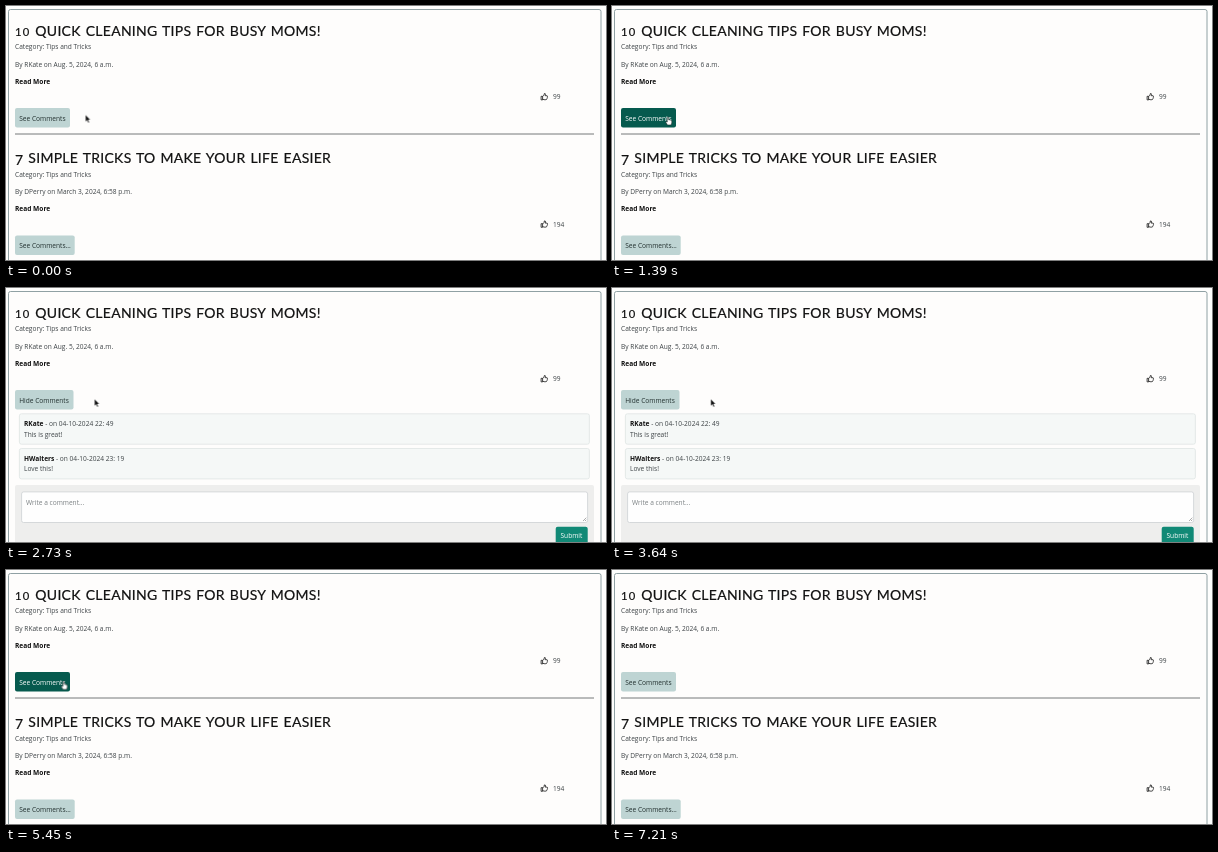
Write an HTML page that moves like this. It is 600 by 254 pixels and loops after 7240 ms.

```html
<!DOCTYPE html>
<html lang="en">
<head>
<meta charset="utf-8">
<title>Blog comments toggle</title>
<style>
  html, body { margin: 0; width: 100%; height: 100%; overflow: hidden; background: #fefefd; }
  svg { display: block; width: 600px; height: 254px; }
  text { font: 6.6px "Open Sans", "Noto Sans", sans-serif; fill: #3d4346; white-space: pre; }
  .title { font: 14px Lato, sans-serif; letter-spacing: .27px; word-spacing: 1.1px; fill: #111; stroke: #111; stroke-width: .2; }
  .low { font-size: 11.2px; letter-spacing: 1.2px; }
  .bold { font-weight: 700; fill: #111; }
  .button { fill: #bed4d3; }
  .label { fill: #22302f; }
  .card { fill: #f5f8f7; stroke: #dfe5e4; stroke-width: .8; }
  .hint { fill: #7b8083; }
  .white { fill: #fff; }

  /* One shared 7.24 s timeline */
  .hot, .hot-label, .cursor, .arrow, .hand, .open, .closed { animation: 7.24s infinite; }
  .hot { animation-name: heat; animation-timing-function: linear; }
  .hot-label { animation-name: heat-label; animation-timing-function: linear; }
  .cursor { animation-name: travel; animation-timing-function: ease-in-out; }
  .arrow { animation-name: arrow; animation-timing-function: step-end; }
  .hand { animation-name: hand; animation-timing-function: step-end; }
  .open { animation-name: open; animation-timing-function: step-end; }
  .closed { animation-name: closed; animation-timing-function: step-end; }

  @keyframes heat {
    0%, 9.25%, 37.7%, 62.4%, 79.4%, 100% { fill: #bed4d3; }
    11.3%, 35.6%, 64.5%, 77.3% { fill: #065a4e; }
  }
  @keyframes heat-label {
    0%, 9.25%, 37.7%, 62.4%, 79.4%, 100% { fill: #22302f; }
    11.3%, 35.6%, 64.5%, 77.3% { fill: #fff; }
  }
  @keyframes travel {
    0%, 4.14% { transform: translate(79.5px, 108.8px); }
    12.43%, 33.15% { transform: translate(56px, 110.9px); }
    40.06%, 53.87% { transform: translate(98.7px, 111px); }
    61.46% { transform: translate(70px, 112px); }
    64.09%, 75.28% { transform: translate(57.5px, 111.4px); }
    81.49%, 100% { transform: translate(88px, 111.3px); }
  }
  @keyframes arrow {
    0%, 35.6%, 77.3% { visibility: visible; }
    9.25%, 62.4%, 96%, 100% { visibility: hidden; }
  }
  @keyframes hand {
    0%, 35.6%, 77.3%, 100% { visibility: hidden; }
    9.25%, 62.4% { visibility: visible; }
  }
  @keyframes open {
    0%, 68.51%, 100% { visibility: hidden; }
    24.86% { visibility: visible; }
  }
  @keyframes closed {
    0%, 68.51%, 100% { visibility: visible; }
    24.86% { visibility: hidden; }
  }
</style>
</head>
<body>
<svg viewBox="0 0 600 254">
  <defs>
    <path id="thumb" d="M.4 3.3H1.9V6.9H.4ZM1.9 3.6L3.3 2.1 3.7.5Q4.9.3 4.8 1.6L4.5 2.7H6.3Q7.1 2.9 6.7 3.7 7 4.2 6.5 4.8 6.6 5.4 6.1 5.8 6 6.7 5.2 6.7H3.4L1.9 6.2"
      fill="none" stroke="#222" stroke-width=".85" stroke-linejoin="round"/>
  </defs>

  <rect x="2.5" y="3.5" width="592.5" height="270" rx="2" fill="#fefdfc" stroke="#84979a" stroke-width=".9"/>

  <text class="title" x="9" y="30"><tspan class="low">10</tspan> QUICK CLEANING TIPS FOR BUSY MOMS!</text>
  <text x="9" y="43.2">Category: Tips and Tricks</text>
  <text x="9" y="60.5">By RKate on Aug. 5, 2024, 6 a.m.</text>
  <text class="bold" x="9" y="77.9">Read More</text>
  <use href="#thumb" x="534.7" y="87"/>
  <text x="547" y="93.2">99</text>

  <g class="closed">
    <rect class="button hot" x="9" y="102" width="55" height="19.5" rx="2"/>
    <text class="label hot-label" x="13.2" y="114.5">See Comments</text>
    <path d="M9 128H588" stroke="#66696a" stroke-width=".9"/>

    <text class="title" x="9" y="157"><tspan dy="2">7</tspan><tspan dy="-2"> SIMPLE TRICKS TO MAKE YOUR LIFE EASIER</tspan></text>
    <text x="9" y="170.6">Category: Tips and Tricks</text>
    <text x="9" y="187.9">By DPerry on March 3, 2024, 6:58 p.m.</text>
    <text class="bold" x="9" y="205.3">Read More</text>
    <use href="#thumb" x="534.7" y="214.4"/>
    <text x="547" y="220.5">194</text>
    <rect class="button" x="9" y="229.5" width="59.7" height="19.5" rx="2"/>
    <text class="label" x="13.2" y="241.9">See Comments...</text>
  </g>

  <g class="open">
    <rect class="button hot" x="9" y="102" width="58.5" height="19.5" rx="2"/>
    <text class="label hot-label" x="13.2" y="114.5">Hide Comments</text>

    <rect class="card" x="13.4" y="125.8" width="570" height="30.4" rx="2"/>
    <text x="18" y="138.1"><tspan class="bold">RKate</tspan> - on 04-10-2024 22: 49</text>
    <text x="18" y="148.6">This is great!</text>

    <rect class="card" x="13.4" y="160.5" width="570" height="30.4" rx="2"/>
    <text x="18" y="172.9"><tspan class="bold">HWalters</tspan> - on 04-10-2024 23: 19</text>
    <text x="18" y="183.4">Love this!</text>

    <rect x="9" y="197" width="579" height="70" rx="2" fill="#eeeeed"/>
    <rect x="15.6" y="203.9" width="566" height="30.6" rx="2" fill="#fefefe" stroke="#cdd1d3" stroke-width=".8"/>
    <text class="hint" x="20" y="216.5">Write a comment...</text>
    <path d="M577 233L580.3 229.7M579 233L580.3 231.7" stroke="#777" stroke-width=".6"/>
    <rect x="549.7" y="238.8" width="32" height="19.2" rx="2" fill="#118976"/>
    <text class="white" x="554.5" y="250.4">Submit</text>
  </g>

  <g class="cursor">
    <path class="arrow" d="M0 0V7L1.6 5.6 2.7 8 3.9 7.5 2.8 5.1H4.9Z" fill="#111" stroke="#fff" stroke-width=".4"/>
    <path class="hand" d="M-.7.6Q0-.4.7.6V3Q1.5 2.5 1.9 3.2 2.6 2.9 2.9 3.6 3.8 3.5 3.8 4.4V6L3 8H-.5L-2.2 5.3Q-2.2 4.2-.7 5Z"
      fill="#fff" stroke="#222" stroke-width=".5" stroke-linejoin="round"/>
  </g>
</svg>
</body>
</html>
```
